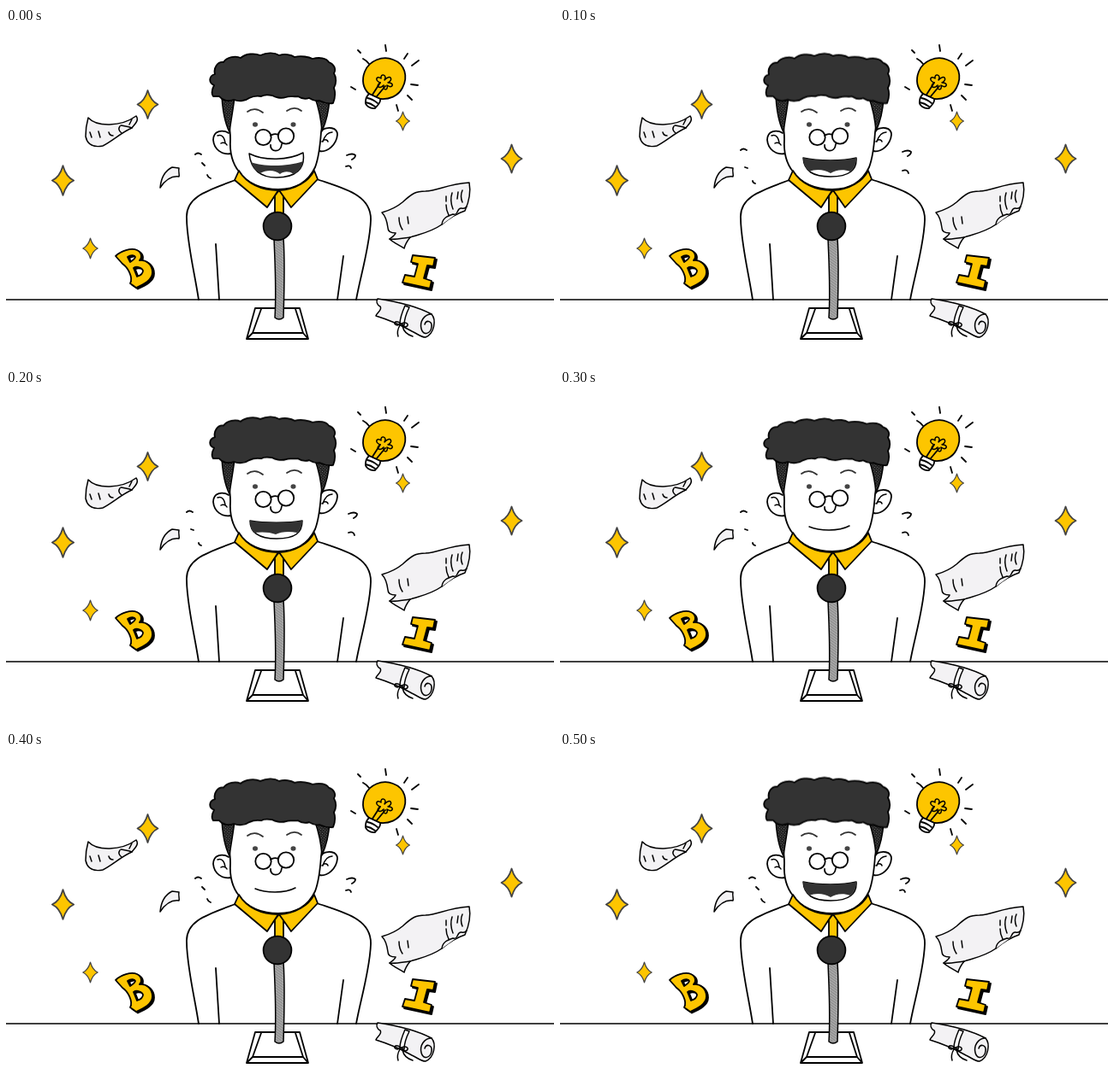
Animation of 640 by 391 pixels, one loop 600 ms. Source, as an HTML page:

```html
<!DOCTYPE html>
<html lang="en">
<head>
<meta charset="utf-8">
<title>Speaker</title>
<style>
  html, body { margin: 0; width: 100%; height: 100%; overflow: hidden; background: #fff; }
  svg { display: block; width: 100vw; height: 100vh; }
  .ink { fill: none; stroke: #000; stroke-width: 1.8; stroke-linecap: round; stroke-linejoin: round; }
  .thin { stroke-width: 1.5; }
  .white { fill: #fff; }
  .paper { fill: #f3f2f4; }
  .gold { fill: #fdc500; }
  .dark { fill: #333; }
  .star { fill: #fdc500; stroke: #444; stroke-width: 1.8; stroke-linejoin: round; vector-effect: non-scaling-stroke; }

  .hair, .wide, .open, .mid, .shut, .near, .far { animation: 600ms step-end infinite; }
  .hair { transform-origin: 312px 87px; animation-name: bob; }
  .wide { animation-name: wide; }
  .open { animation-name: open; }
  .mid { animation-name: mid; }
  .shut { animation-name: shut; }
  .near { animation-name: near; }
  .far { animation-name: far; }

  @keyframes bob {
    0% { transform: none; }
    16.667% { transform: scaleY(.99); }
    33.333% { transform: scaleY(.965); }
    50% { transform: scaleY(.93); }
    66.667% { transform: scaleY(.965); }
    83.333%, 100% { transform: scaleY(.99); }
  }
  @keyframes wide { 0% { opacity: 1; } 16.667%, 100% { opacity: 0; } }
  @keyframes open { 0%, 33.333% { opacity: 0; } 16.667%, 83.333%, 100% { opacity: 1; } }
  @keyframes mid { 0%, 50%, 100% { opacity: 0; } 33.333% { opacity: 1; } }
  @keyframes shut { 0%, 83.333%, 100% { opacity: 0; } 50% { opacity: 1; } }
  @keyframes near { 0%, 66.667%, 100% { opacity: 1; } 16.667% { opacity: 0; } }
  @keyframes far { 0%, 66.667%, 100% { opacity: 0; } 16.667% { opacity: 1; } }
</style>
</head>
<body>
<svg viewBox="0 0 640 391" preserveAspectRatio="none">
  <defs>
    <pattern id="grey" width="2.6" height="2.6" patternUnits="userSpaceOnUse" patternTransform="rotate(35)">
      <rect width="2.6" height="2.6" fill="#aaa"/><path d="M0 1.3H2.6" stroke="#888"/>
    </pattern>
    <pattern id="hatch" width="2.4" height="2.4" patternUnits="userSpaceOnUse" patternTransform="rotate(40)">
      <rect width="2.4" height="2.4" fill="#222"/><circle cx="1.2" cy="1.2" r=".45" fill="#888"/>
    </pattern>
    <path id="spark" d="M0-16.500Q3.500-4 12 0Q3.500 4 0 16.500Q-3.500 4-12 0Q-3.500-4 0-16.500Z"/>
    <path id="b" fill-rule="evenodd" d="M128 267C134 261 146 257 153 260C159 263 159 269 156 272C164 271 171 277 171 286C171 295 161 300 152 304L145 299C149 292 142 280 136 276ZM142 268C145 266 150 265 151 268C151 270 148 272 145 274ZM149 281C153 278 159 281 160 284C160 288 156 290 153 291Z"/>
    <path id="i" d="M475 266L501 269L499 279L492 278L488 293L497 296L495 305L463 298L466 289L477 291L481 276L473 274Z"/>
  </defs>

  <path class="ink thin" d="M0 318H640"/>

  <!-- body -->
  <g class="ink">
    <path class="white" stroke="none" d="M225 317C219 285 211 250 211 222C210 196 236 190 268 178H363C395 190 427 195 426 225C425 255 414 290 409 317Z"/>
    <path d="M225 318C220 285 211 250 211 222C210 197 236 190 268 178M363 177C395 188 427 195 426 225C425 255 414 290 409 318M245 253L249 318M394 267L387 318"/>
  </g>

  <!-- head -->
  <g class="ink">
    <path class="white" d="M260 123C252 118 242 121 242 131C243 142 252 149 263 147M368 120C376 115 387 116 387 125C386 136 376 146 366 144"/>
    <path class="thin" d="M247 126C252 124 255 128 256 134M251 135C254 133 257 135 258 137M381 122C376 122 372 127 370 133M369 133C371 130 375 130 376 133"/>
    <path class="white" d="M256 84C259 100 262 116 262 130C261 146 264 158 272 168C282 183 300 189 318 189C340 189 354 178 361 163C366 150 367 136 368 122L374 84"/>
    <path fill="url(#hatch)" class="thin" d="M252 80L267 80C266 92 263 106 261 122C256 112 253 98 252 80ZM361 82L378 82C377 98 374 110 369 121C368 108 366 96 361 82Z"/>
  </g>
  <path class="ink hair dark" d="M242 80C239 76 241 71 243 67C236 64 237 56 244 54C242 47 247 39 254 40C258 34 268 32 274 35C280 30 290 29 297 32C304 29 313 28 319 32C325 30 333 31 337 34C345 32 354 34 358 36C366 34 374 35 377 40C383 42 386 48 383 53C386 58 386 65 383 70C385 76 384 83 382 88C376 89 370 87 366 85C361 86 357 84 354 82C349 84 344 82 341 80C336 81 331 79 327 81C321 83 314 81 311 79C306 78 301 78 298 80C293 79 288 80 284 82C279 86 271 86 266 84C259 87 252 84 249 80Z"/>

  <g class="ink">
    <g stroke="#333">
      <path d="M282 98C287 94 294 94 300 99M328 97C334 93 340 93 345 97"/>
      <ellipse cx="291" cy="113" rx="3" ry="2.800" fill="#444" stroke="none"/>
      <ellipse cx="335.500" cy="113" rx="3" ry="2.800" fill="#444" stroke="none"/>
    </g>
    <path class="white" d="M309 137C308 145 321 147 322 136"/>
    <circle class="white" cx="300.500" cy="128" r="9.200"/>
    <circle class="white" cx="327" cy="126.500" r="9.200"/>
    <path d="M309 126Q313 123 318 125"/>
  </g>

  <!-- mouths -->
  <g class="ink thin">
    <g class="wide">
      <path class="white" d="M284 147C302 156 330 155 347 146C350 165 338 175 316 175C297 175 286 166 284 147Z"/>
      <path class="dark" stroke="none" d="M286 157C302 163 330 162 347 156C346 163 342 168 336 171C330 167 324 168 320 171C314 166 304 166 297 170C291 167 288 162 286 157Z"/>
    </g>
    <g class="open">
      <path class="white" d="M284 152C302 156 330 156 346 152C347 166 338 174 316 174C296 174 285 168 284 152Z"/>
      <path class="dark" stroke="none" d="M284 152C302 156 330 156 346 152C346 159 344 164 339 168C331 165 322 166 316 170C308 165 298 165 291 168C286 163 284 158 284 152Z"/>
    </g>
    <g class="mid">
      <path class="white" d="M285 153C302 156 330 156 346 153C346 167 338 174 316 174C296 174 285 168 285 153Z"/>
      <path class="dark" stroke="none" d="M285 153C302 156 330 156 346 153C346 159 344 163 340 167C330 165 321 166 315 169C308 166 298 166 289 167C286 163 285 158 285 153Z"/>
    </g>
    <path class="shut" d="M291 160C303 165 325 166 338 159"/>
  </g>

  <!-- shake marks -->
  <g class="ink">
    <path class="near" d="M221 148Q224 145 228 148M229 158L232 161M235 172Q236 175 239 176M398 149Q405 146 408 149Q408 152 404 154M397 162Q402 160 403 164"/>
    <path class="far" d="M211 143Q214 140 218 143M216 163L219 164M225 179Q225 181 228 182M400 145Q407 142 410 145Q410 148 406 150M400 167Q406 165 407 170"/>
  </g>

  <!-- collar -->
  <g class="ink gold">
    <path d="M314 196L319 190L324 196V217H314Z"/>
    <path d="M272 167L267 178L305 210L318 190C298 190 281 182 272 167ZM360 167L364 177L333 210L319 190C338 189 353 180 360 167Z"/>
  </g>

  <!-- microphone -->
  <g class="ink">
    <path class="white" d="M291 328H343L353 364H281Z"/>
    <path d="M298 329L288 357H347L338 329M288 357L282 363M347 357L352 363"/>
    <path fill="url(#grey)" class="thin" d="M313 246H324C326 275 325 305 324 339Q319 343 314 339C316 305 314 275 313 246Z"/>
    <circle class="dark" cx="317" cy="232" r="16.400"/>
  </g>

  <!-- bulb -->
  <g class="ink">
    <path class="gold" d="M424 77C417 71 415 61 419 51C424 38 440 32 452 37C466 42 470 57 463 70C458 80 447 84 437 83Z"/>
    <path class="white" d="M424 77L437 83C438 88 434 90 431 94C426 95 419 91 420 86C420 82 422 79 424 77Z"/>
    <path d="M422 82Q428 83 434 88M420 87Q426 88 431 92M428 78L437 64M433 80L443 68"/>
    <path class="thin" d="M437 64C430 61 433 55 438 59C437 52 446 55 442 61C449 53 453 61 446 64C455 64 451 72 445 67C447 74 439 73 441 67C436 72 431 68 437 64"/>
    <path d="M411 26L414 29M417 36Q421 38 424 42M443 20L444 27M465 36L469 30M474 44L482 38M473 66L481 67M469 79L474 84M456 90L458 97M403 69L408 72"/>
  </g>

  <!-- sparkles -->
  <use class="star" href="#spark" transform="translate(165.500 89.500)"/>
  <use class="star" href="#spark" transform="translate(66.500 178.500) scale(1.050)"/>
  <use class="star" href="#spark" transform="translate(98.500 258) scale(.72)"/>
  <use class="star" href="#spark" transform="translate(463.500 109) scale(.66)"/>
  <use class="star" href="#spark" transform="translate(590.500 153)"/>

  <!-- letters -->
  <g class="ink">
    <use href="#b" x="2" y="1.500" fill="#000"/><use class="gold" href="#b"/>
    <use href="#i" x="2" y="2" fill="#000"/><use class="gold" href="#i"/>
  </g>

  <!-- papers -->
  <g class="ink thin paper">
    <path d="M96 105C106 116 134 116 152 103C156 108 150 113 147 117C135 122 125 132 113 138C103 140 95 137 93 127C93 118 94 112 96 105Z"/>
    <path d="M134 114C139 115 143 115 147 117M147 107L144 113M98 122L100 128M108 121L110 128M120 122Q121 126 125 126M133 115Q130 119 135 123"/>
    <path d="M180 187C181 176 186 167 194 163L202 164C201 168 203 172 202 174C194 173 186 178 180 187Z"/>
    <path d="M439 216C446 214 456 210 463 204C474 194 478 191 490 191C505 190 515 183 541 181C543 192 540 205 536 214C527 217 516 224 509 230C495 240 480 242 472 245C468 250 466 254 465 258C459 254 452 251 448 247C452 244 454 243 455 240C449 240 446 238 446 234C445 226 443 220 439 216Z"/>
    <path d="M448 247C455 248 463 246 472 245M459 222Q459 230 463 236M469 221L470 229M514 197V203M514 207Q514 213 517 219M521 193Q518 202 522 212M528 192L527 200M533 190Q530 197 533 204M509 230C510 222 516 220 522 218C529 220 526 210 532 211Q536 212 538 209"/>
  </g>

  <!-- scroll -->
  <g class="ink thin paper">
    <path d="M434 317C455 320 480 326 497 335C503 342 500 358 490 362C484 362 481 358 474 355C460 347 445 341 432 337C433 333 440 330 437 326C433 324 432 320 434 317Z"/>
    <path d="M497 335C488 335 483 344 485 352C487 361 496 358 497 350C498 343 491 341 489 347"/>
    <path class="white" d="M466 325C463 332 460 339 460 346L465 348C465 340 468 333 471 327Z"/>
    <path fill="none" d="M461 346C454 341 451 347 457 348L462 346C469 343 472 349 466 350L461 346M460 348Q456 355 458 361M463 349Q465 358 475 361"/>
  </g>
</svg>
</body>
</html>
```
